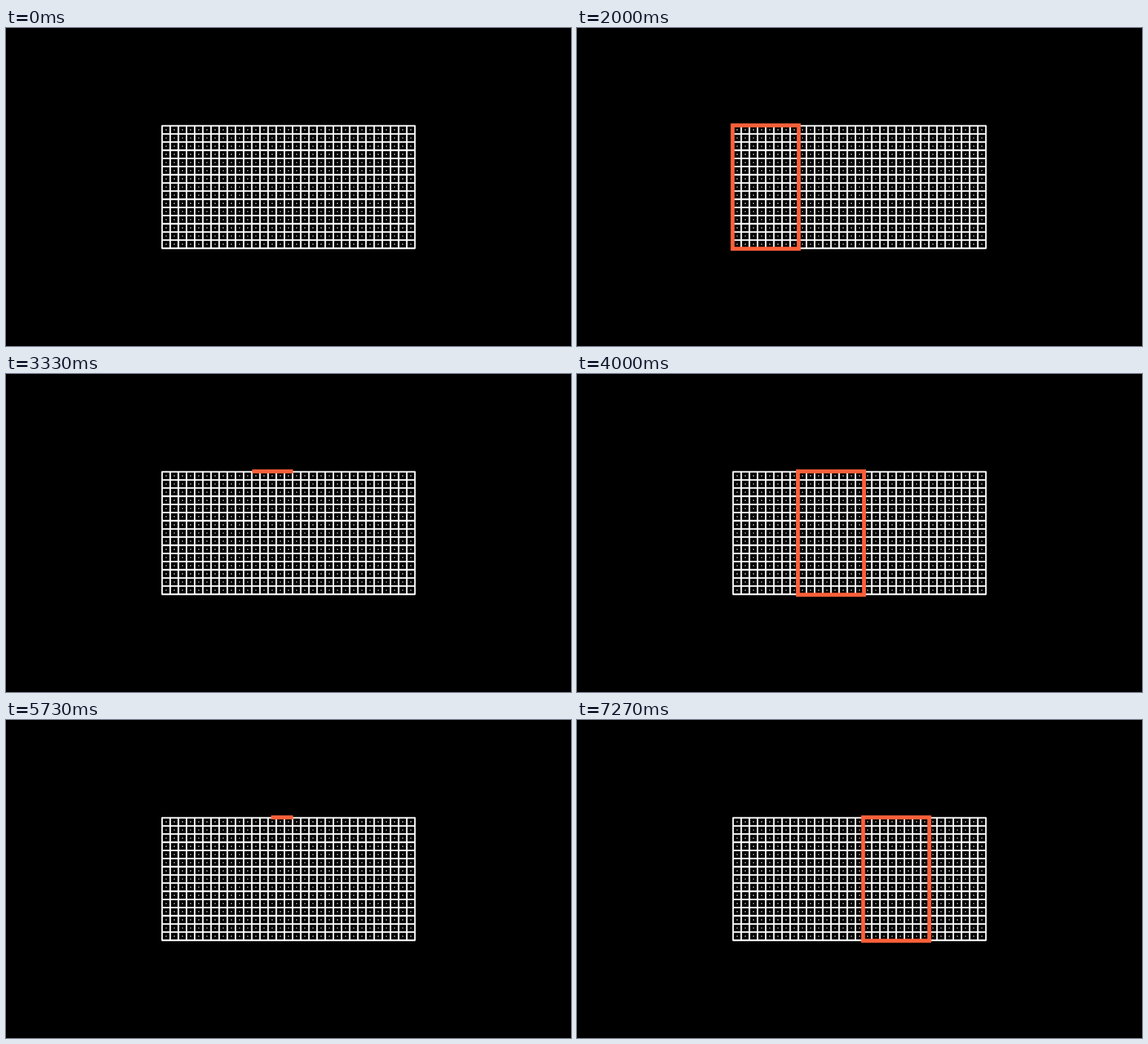
An HTML page that plays this animation: 854x480 px, repeating every 8 s.

```html
<!DOCTYPE html>
<html lang="en">
<head>
<meta charset="utf-8">
<title>Grid window</title>
<style>
  html, body { margin: 0; width: 100%; height: 100%; overflow: hidden; background: #000; }
  svg { display: block; width: 100vw; height: 100vh; }
</style>
</head>
<body>
<svg viewBox="0 0 854 480">
  <path id="grid" fill="none" stroke="#fff" stroke-width="2.3" stroke-linejoin="round"/>
  <path id="dots" fill="none" stroke="#fffff0" stroke-width="1.7" stroke-linecap="round"/>
  <path id="box" fill="none" stroke="#fe6039" stroke-width="6" stroke-miterlimit="10"/>
</svg>
<script>
const LOOP = 8000, STEP = 1000 / 15;
const COLS = 31, ROWS = 15, CELL = 12.33, SPAN = 8, PAD = 0.65;
const left = 427 - COLS * CELL / 2, top0 = 240 - ROWS * CELL / 2;
const right = left + COLS * CELL, bottom = top0 + ROWS * CELL;
const el = id => document.getElementById(id);

function drawGrid() {
  let lines = `M${left} ${top0}H${right}V${bottom}H${left}Z`, dots = '';
  for (let c = 1; c < COLS; c++) lines += `M${left + c * CELL} ${top0}V${bottom}`;
  for (let r = 1; r < ROWS; r++) lines += `M${left} ${top0 + r * CELL}H${right}`;
  for (let r = 0; r < ROWS; r++)
    for (let c = 0; c < COLS; c++)
      dots += `M${left + (c + 0.5) * CELL} ${top0 + (r + 0.5) * CELL}h0`;
  el('grid').setAttribute('d', lines);
  el('dots').setAttribute('d', dots);
}

// Normalised sigmoid from 0 to 1
function smooth(t) {
  const s = x => 1 / (1 + Math.exp(-10 * x));
  const u = Math.min(1, Math.max(0, t));
  return (s(u - 0.5) - s(-0.5)) / (s(0.5) - s(-0.5));
}

// Outline from the top right corner, counterclockwise; each side takes a quarter
function outline(col, part) {
  const x0 = left + col * CELL - PAD, x1 = left + (col + SPAN) * CELL + PAD;
  const y0 = top0 - PAD, y1 = bottom + PAD;
  if (part < 0.0001) return '';
  if (part > 0.9999) return `M${x1} ${y0}H${x0}V${y1}H${x1}Z`;
  const pts = [[x1, y0], [x0, y0], [x0, y1], [x1, y1], [x1, y0]];
  const side = Math.floor(part * 4), k = part * 4 - side;
  const [a, b] = [pts[side], pts[side + 1]];
  const tip = a.map((v, i) => v + (b[i] - v) * k);
  return 'M' + [...pts.slice(0, side + 1), tip].map(p => p.join(' ')).join('L');
}

// Each window: drawn for 1 s, held for 1 s, undrawn for 1 s
function render(ms) {
  const t = Math.floor((ms % LOOP + 3.4) / STEP) * STEP / 1000 % 8;
  const index = Math.floor(t / 3 + 1e-6), local = t - index * 3;
  const part = local < 2 ? smooth(local) : 1 - smooth(local - 2);
  el('box').setAttribute('d', outline(index * SPAN, part));
}

drawGrid();
render(0);
const start = performance.now();
(function tick() {
  render(performance.now() - start);
  requestAnimationFrame(tick);
})();
</script>
</body>
</html>
```
